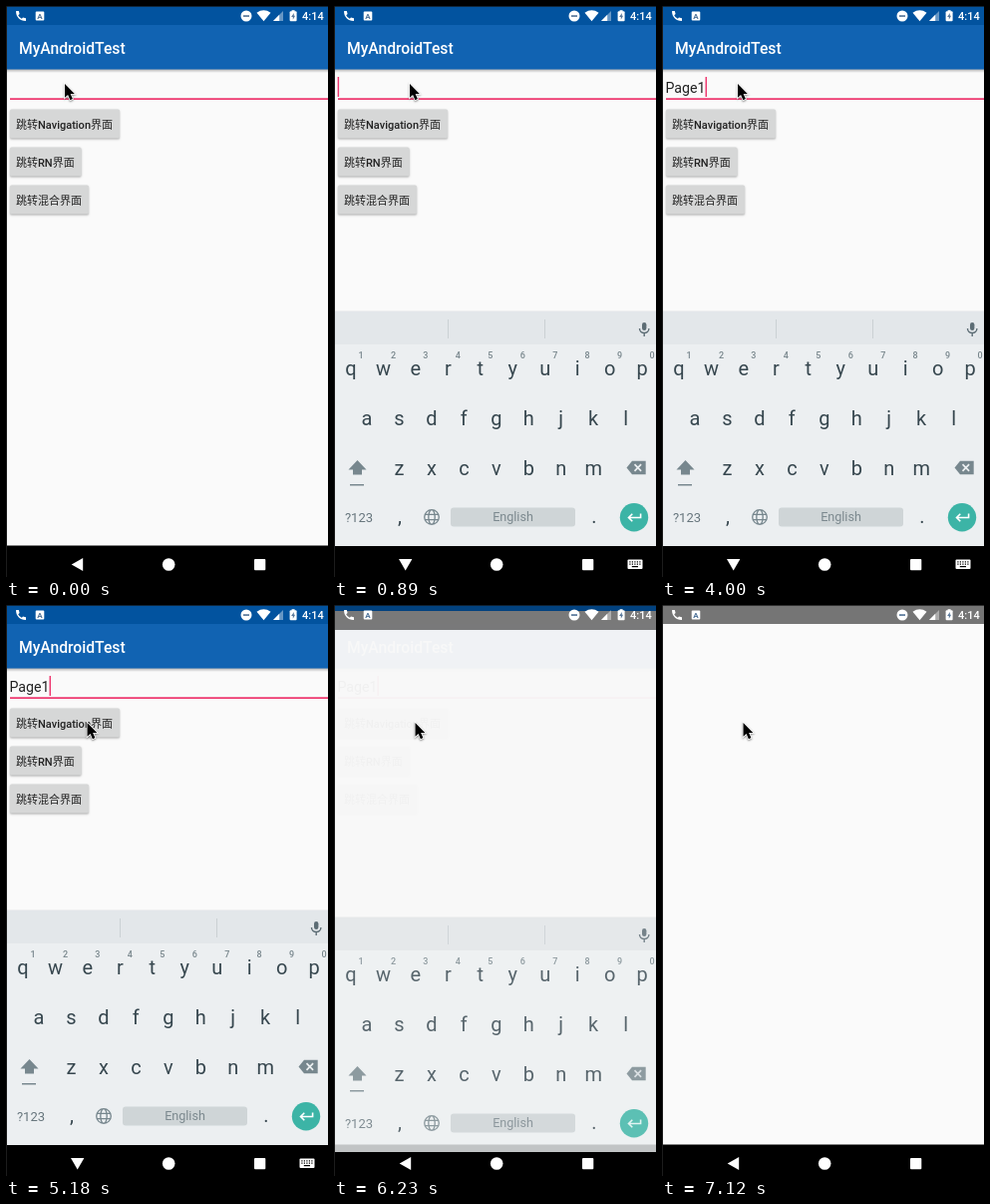
Animation of 323 by 572 pixels, one loop 8 s. Source, as an HTML page with a canvas:

```html
<!DOCTYPE html>
<html lang="zh-CN">
<head>
<meta charset="utf-8">
<title>MyAndroidTest</title>
<style>
html, body { margin: 0; width: 323px; height: 572px; overflow: hidden; background: #fafafa }
canvas { display: block }
</style>
</head>
<body>
<canvas id="stage" width="323" height="572"></canvas>
<script>
const W = 323, H = 572, LOOP = 8000, TICK = LOOP / 54;
const c = document.getElementById('stage').getContext('2d');
const PINK = '#ee3a70', INK = '#37474f', GREY = '#78868c';

// Tracks hold [tick, ...values]; each entry stays until the next one.
const typed = [[0, ''], [16, 'P'], [19, 'Pa'], [21, 'Pag'], [25, 'Page'], [27, 'Page1']];
const hints = [[0], [17, 'Part', 'P', 'Play'], [20, 'Past', 'Pa', 'Paint'],
  [22, 'Page', 'Pag', 'Pages'], [26, 'Pages', 'Page', 'Paged'], [27]];
const caret = [[0, 0], [1, 1], [11, 0], [14, 1], [30, 0], [33, 1]];
const mouse = [[0, 59, 78], [3, 68, 78], [4, 76, 78], [29, 83, 86], [30, 108, 112], [31, 138, 146],
  [32, 144, 157], [33, 122, 142], [34, 94, 124], [35, 81.5, 118]];
const keyboard = [[0, 0, 0], [4, 16, .4], [5, 6, .8], [6, 0, 1], [41, 1, .95], [42, 7, .82], [43, 0, 0]];
const page = [[0, 0, 0], [41, 24, .5], [42, 6, .955], [43, 0, 1]];

const at = (track, k) => track.filter(e => e[0] <= k).pop().slice(1);

function rect(x, y, w, h, color, r = 0) {
  c.fillStyle = color;
  c.beginPath();
  c.roundRect(x, y, w, h, r);
  c.fill();
}

function disc(x, y, r, color) {
  c.fillStyle = color;
  c.beginPath();
  c.arc(x, y, r, 0, 7);
  c.fill();
}

function shape(d, x, y, fill, stroke, width = 1) {
  const p = new Path2D(d);
  c.save();
  c.translate(x, y);
  if (fill) { c.fillStyle = fill; c.fill(p); }
  if (stroke) { c.strokeStyle = stroke; c.lineWidth = width; c.stroke(p); }
  c.restore();
}

function text(s, x, y, size, color, align = 'left', weight = 400) {
  c.font = `${weight} ${size}px Roboto, "Noto Sans CJK SC", "Noto Sans CJK", sans-serif`;
  c.textAlign = align;
  c.fillStyle = color;
  c.fillText(s, x, y);
  return c.measureText(s).width;
}

function button(label, y, w) {
  c.save();
  c.shadowColor = 'rgba(0,0,0,.3)';
  c.shadowBlur = 2;
  c.shadowOffsetY = 1;
  rect(4, y, w, 29, '#d6d7d7', 1.5);
  c.restore();
  text(label, 10, y + 19, 11, '#222', 'left', 500);
}

function form(k) {
  rect(0, 0, W, H, '#fafafa');
  const shade = c.createLinearGradient(0, 63, 0, 67);
  shade.addColorStop(0, 'rgba(0,0,0,.3)');
  shade.addColorStop(1, 'rgba(0,0,0,0)');
  rect(0, 63, W, 4, shade);
  rect(0, 0, W, 19, '#02539f');
  rect(0, 19, W, 44.5, '#1163b2');
  text('MyAndroidTest', 13, 48, 15.7, '#fff', 'left', 500);

  const [value] = at(typed, k);
  const width = text(value, 3.5, 87, 14.15, '#222');
  if (value && k < 27) rect(4, 88, width, 1, '#333');
  if (at(caret, k)[0]) rect(3.6 + width, 71, 1.5, 20, PINK);
  rect(4, 92.3, 319, 1.6, PINK);

  button('跳转Navigation界面', 103.5, 110);
  button('跳转RN界面', 141.5, 71.5);
  button('跳转混合界面', 179.5, 79);
}

function newPage(k) {
  const [y, alpha] = at(page, k);
  if (!alpha) return;
  rect(0, 0, W, H, 'rgba(0,0,0,.2)');
  c.globalAlpha = alpha;
  rect(0, y, W, H, '#fafafa');
  rect(0, y, W, 19, '#757575');
  c.globalAlpha = 1;
}

function keys(k) {
  const [y, alpha] = at(keyboard, k);
  if (!alpha) return;
  c.save();
  c.globalAlpha = alpha;
  c.translate(0, y);
  rect(0, 306, W, 235, '#eceff1');
  rect(0, 306, W, 33, '#e3e7ea');
  rect(0, 305, W, 1, '#eeeff0');
  rect(114, 314, 1, 19, '#cbd1d4');
  rect(211, 314, 1, 19, '#cbd1d4');

  const [left, mid, right] = at(hints, k);
  if (mid) {
    text(left, 71.5, 329, 14.2, '#728087', 'center');
    text(mid, 163, 329, 14.2, '#52646c', 'center', 700);
    text(right, 254.5, 329, 14.2, '#728087', 'center');
    for (const x of [158.5, 163, 167.5]) disc(x, 336.5, 1.2, '#52646c');
  }
  rect(309, 317, 4.4, 8, '#5d6d75', 2.2);
  shape('M-4.7 -1C-4.7 5 4.7 5 4.7 -1M0 3.5V7', 311.2, 324, null, '#5d6d75', 1.4);

  const row = (letters, x, base) =>
    [...letters].forEach((l, i) => text(l, x + i * 32.45, base, 20, INK, 'center'));
  row('qwertyuiop', 17, 370);
  row('asdfghjkl', 33, 420);
  row('zxcvbnm', 65.5, 470);
  [...'1234567890'].forEach((d, i) => text(d, 27 + i * 32.45, 353, 9, GREY, 'center', 500));

  shape('M0 -8L9 1.5H4.5V6.5H-4.5V1.5H-9Z', 23.5, 463, '#77878e');
  rect(16, 479, 14, 1.5, '#77878e');
  shape('M-9.5 0L-4 -6.7H9.7V6.7H-4Z', 303, 462.5, '#77878e');
  shape('M-1.5 -3.3L5.1 3.3M5.1 -3.3L-1.5 3.3', 303, 462.5, null, '#eceff1', 1.7);

  text('?123', 25, 517, 13, '#66757c', 'center');
  text(',', 66, 518, 20, INK, 'center');
  text('.', 261, 518, 20, INK, 'center');
  shape('M7.3 0A7.3 7.3 0 1 1 -7.3 0A7.3 7.3 0 1 1 7.3 0M3.2 0A3.2 7.3 0 1 1 -3.2 0A3.2 7.3 0 1 1 3.2 0M-6.7 -2.7H6.7M-6.7 2.7H6.7',
    98, 512, null, '#77878e', 1.3);
  rect(117, 502.5, 125, 19, '#cfd5d7', 3);
  text('English', 179.5, 516, 12.6, '#7c898f', 'center');
  disc(301, 512.3, 14.2, '#3cb4a6');
  shape('M6.3 -4V0H-5.5M-2 -3.8L-5.8 0L-2 3.8', 301.3, 512.5, null, '#fff', 1.6);
  c.restore();
}

function statusIcons() {
  shape('M-5 -4.7Q-5 -5 -4.5 -5H-2.2L-1.4 -2L-2.8 -.8Q-1.6 1.8 .8 2.8L2 1.4L5 2.2V4.5Q5 5 4.7 5C-1 5 -5 1 -5 -4.7Z', 15, 10, '#fff');
  rect(29.7, 5.5, 8.6, 9, '#fff', 1);
  text('A', 34, 13, 8, '#4a6f96', 'center', 700);
  disc(241, 10, 5.5, '#fff');
  rect(238, 9.2, 6, 1.7, '#59789a');
  shape('M-7 -2.6Q0 -7.4 7 -2.6L0 6Z', 258.5, 9.3, '#fff');
  shape('M5 -5V5H-5Z', 273, 10, 'rgba(255,255,255,.4)');
  shape('M1.2 -1.2V5H-5Z', 273, 10, '#fff');
  rect(284.6, 5.2, 7, 10, '#fff', 1);
  rect(286.6, 4.2, 3, 2, '#fff');
  shape('M.7 -3.3L-2 .6H-.3V3.5L2 -.6H.7Z', 288.1, 10.3, '#59789a');
  text('4:14', 297, 14, 11, '#fff', 'left', 500);
}

function navIcons(k) {
  const open = k >= 4 && k < 42;
  shape(open ? 'M-6.7 -5.5H6.7L0 6Z' : 'M-6 0L5.5 -6.5V6.5Z', 71.7, 559.5, '#fff');
  disc(163.2, 559.5, 6.3, '#fff');
  rect(249, 554, 11.3, 11.3, '#fff', 1);
  if (!open) return;
  rect(294.5, 554.5, 15, 9.5, '#fff', 1);
  for (let i = 0; i < 10; i++)
    rect(296.3 + i % 5 * 2.5, 556.3 + (i / 5 | 0) * 2.3, 1.2, 1.2, '#000');
  rect(298.8, 561, 6.2, 1.2, '#000');
}

function pointer(k) {
  const [x, y] = at(mouse, k);
  c.save();
  c.shadowColor = 'rgba(0,0,0,.35)';
  c.shadowBlur = 2;
  c.shadowOffsetY = 1;
  shape('M0 0V13.8L3.1 10.9L5.4 16.2L7.9 15.1L5.6 9.9H9.8Z', x, y, '#000', '#fff', 1.6);
  c.restore();
  shape('M0 0V13.8L3.1 10.9L5.4 16.2L7.9 15.1L5.6 9.9H9.8Z', x, y, '#000');
}

function draw(now) {
  // The screen refreshes on whole ticks; the small lead absorbs rounding.
  const k = Math.floor((now % LOOP + 6) / TICK) % 54;
  form(k);
  newPage(k);
  rect(0, 540.5, W, 32, '#000');
  keys(k);
  statusIcons();
  navIcons(k);
  rect(0, 0, 1, H, '#1c1c1c');
  rect(0, 0, W, 1, 'rgba(20,20,20,.7)');
  pointer(k);
}

const start = performance.now();
(function frame() {
  draw(performance.now() - start);
  requestAnimationFrame(frame);
})();
</script>
</body>
</html>
```
